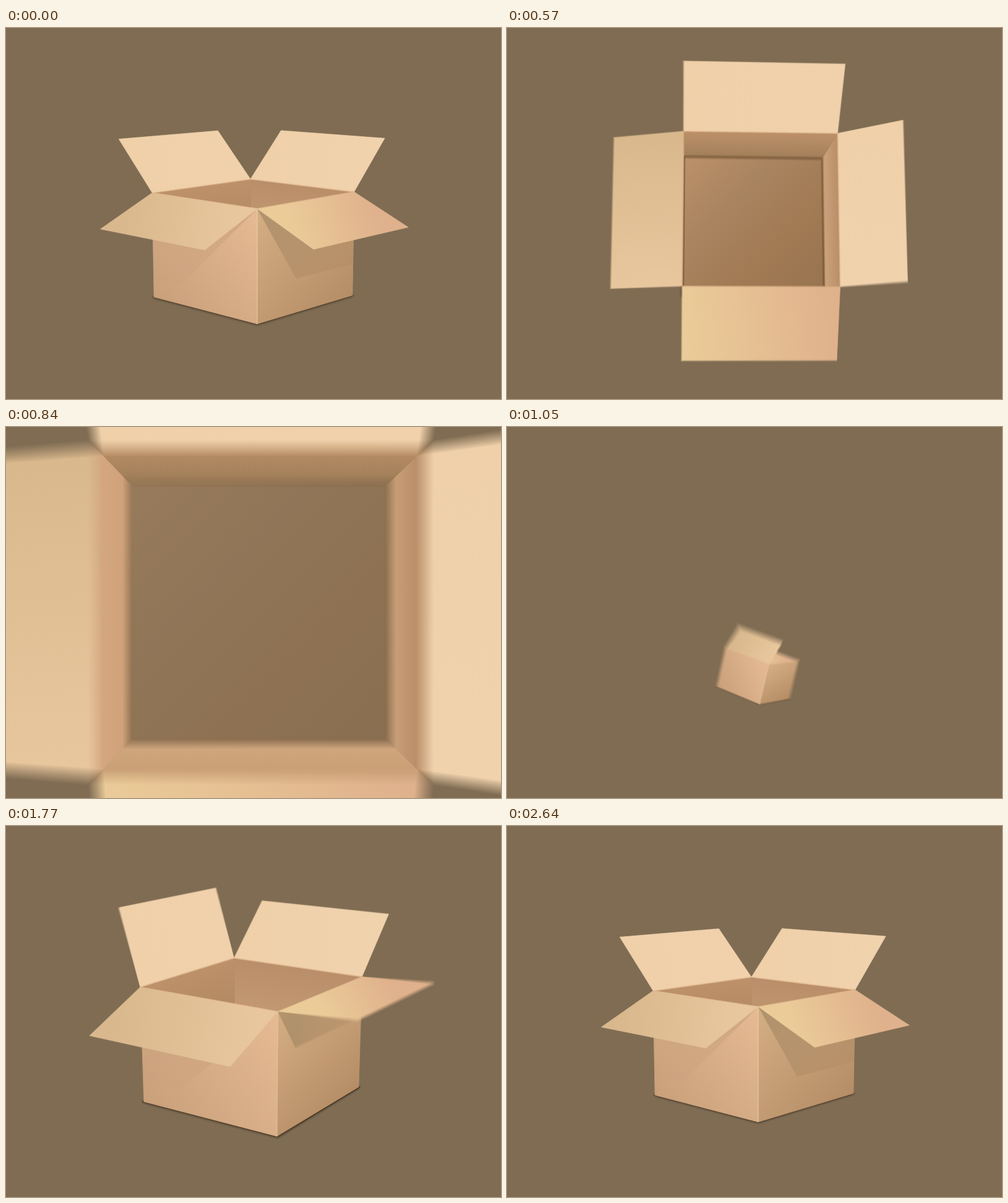
Animation of 800 by 600 pixels, one loop 2670 ms. Source, as an HTML page with a canvas:

```html
<!DOCTYPE html>
<html lang="en">
<head>
<meta charset="utf-8">
<title>Box loop</title>
<style>
  html, body { margin: 0; width: 100%; height: 100%; overflow: hidden; background: #7f6c53; }
  canvas { display: block; width: 800px; height: 600px; }
</style>
</head>
<body>
<canvas id="stage" width="800" height="600"></canvas>
<script>
const LOOP = 2670, STEP = 30, SHUTTER = 15, SAMPLES = 12;
const BG = '#7f6c53', FOCAL = 1560, NEAR = 20;
const SIDE = 231, HEIGHT = 173, FLAP = SIDE / 2;
const DIVE_END = 945, SPAWN = 950;
const RAD = Math.PI / 180;

const view = document.getElementById('stage').getContext('2d');
const buffer = document.createElement('canvas');
buffer.width = 800;
buffer.height = 600;
const ctx = buffer.getContext('2d');

// Sides run left, front, right, back; "out" is the outward direction on the floor plane.
const CORNERS = [[-.5, -.5], [.5, -.5], [.5, .5], [-.5, .5]];
const SIDES = [
  { out: [0, -1], rest: 203, opens: 950, flap: ['#d9b88d', '#e9c79e'], inner: ['#d6aa84', '#d0a27a'], outer: ['#c8a07a', '#e6bb94'] },
  { out: [1, 0], rest: 203, opens: 1322, flap: ['#ebcc99', '#dfb18c'], inner: ['#c9a076', '#d2a880'], outer: ['#d5ae84', '#b58d66'] },
  { out: [0, 1], rest: 135, opens: 1097, flap: ['#f0d2ad', '#efd0a9'], inner: ['#b98e69', '#cda57c'], outer: ['#c9a27c', '#c9a27c'] },
  { out: [-1, 0], rest: 135, opens: 1386, flap: ['#f0d1ab', '#efd0a9'], inner: ['#bd9169', '#a3805a'], outer: ['#c9a27c', '#c9a27c'] }
];
const FLAP_ORDER = [2, 3, 1, 0];

const POP = {
  scale: [[SPAWN, 0], [1050, .378], [1410, 1.2], [1650, 1.13], [2160, 1.032], [LOOP, 1]],
  turn: [[SPAWN, 40], [1050, 33.4], [1440, 28], [1650, 32], [2160, 39.3], [LOOP, 43.1]],
  pitch: [[SPAWN, 5], [1050, 10.4], [1430, 20.7], [1650, 17], [2160, 11.9], [LOOP, 9.6]],
  roll: [[SPAWN, 18], [1050, 12.7], [1400, 0], [LOOP, 0]]
};

const clamp = x => Math.min(1, Math.max(0, x));
const inOut = (x, power) => x < .5 ? (2 * x) ** power / 2 : 1 - (2 - 2 * x) ** power / 2;
const outQuad = x => 1 - (1 - x) ** 2;
const mix = (p, q, k) => p.map((v, i) => v + (q[i] - v) * k);

// Monotone cubic through [time, value] keys.
function track(keys, t) {
  const slope = i => (keys[i + 1][1] - keys[i][1]) / (keys[i + 1][0] - keys[i][0]);
  const tangent = i => {
    if (i === 0) return slope(0);
    if (i === keys.length - 1) return 0;
    const a = slope(i - 1), b = slope(i);
    return a * b <= 0 ? 0 : 2 * a * b / (a + b);
  };
  let i = 0;
  while (i < keys.length - 2 && t > keys[i + 1][0]) i++;
  const [t0, v0] = keys[i], [t1, v1] = keys[i + 1];
  const d = t1 - t0, x = clamp((t - t0) / d), y = 1 - x;
  return v0 * y * y * (1 + 2 * x) + v1 * x * x * (3 - 2 * x)
    + d * x * y * (tangent(i) * y - tangent(i + 1) * x);
}

function divePose(t) {
  const u = inOut(clamp(t / 785), 2.3);
  const rush = Math.max(0, (t - 255) / 465) ** 3;
  return {
    turn: 43.1 + 28.9 * u,
    pitch: 9.6 + 80.4 * u,
    roll: u * (73.2 - 55.2 * u),
    scale: 1,
    pivot: .5,
    at: [5 * u, 51 * (1 - u), 1575 + 85 * u - 449 * rush],
    fade: clamp((t - 750) / 170),
    angles: SIDES.map(s => s.rest)
  };
}

function popPose(t) {
  const roll = track(POP.roll, t);
  return {
    turn: track(POP.turn, t),
    pitch: track(POP.pitch, t),
    roll,
    scale: track(POP.scale, t),
    pivot: 1,
    at: [-.15 * roll, 136.3 - .35 * roll, 1589],
    fade: 0,
    angles: SIDES.map(s => s.rest * outQuad(clamp((t - s.opens) / 700)))
  };
}

// Returns a function from box coordinates (floor plane u, v; depth below the rim) to camera space.
function placer(pose) {
  const [ca, cp, cr] = [pose.turn, pose.pitch, pose.roll].map(d => Math.cos(d * RAD));
  const [sa, sp, sr] = [pose.turn, pose.pitch, pose.roll].map(d => Math.sin(d * RAD));
  const rolled = ([x, y, z]) => [x * cr - y * sr, x * sr + y * cr, z];
  const e1 = rolled([ca, sa * sp, -sa * cp]);
  const e2 = rolled([sa, -ca * sp, ca * cp]);
  const e3 = rolled([0, cp, sp]);
  return (u, v, down) => pose.at.map((c, i) =>
    c + pose.scale * (u * e1[i] + v * e2[i] + (down - HEIGHT * pose.pivot) * e3[i]));
}

function project([x, y, z]) {
  const k = FOCAL / Math.max(z, NEAR);
  return [400 + x * k, 300 + y * k];
}

function clipNear(points) {
  const result = [];
  points.forEach((p, i) => {
    const q = points[(i + 1) % points.length];
    if (p[2] >= NEAR) result.push(p);
    if ((p[2] >= NEAR) !== (q[2] >= NEAR)) result.push(mix(p, q, (NEAR - p[2]) / (q[2] - p[2])));
  });
  return result;
}

function area(points) {
  const flat = clipNear(points).map(project);
  return flat.reduce((sum, p, i) => {
    const q = flat[(i + 1) % flat.length];
    return sum + p[0] * q[1] - q[0] * p[1];
  }, 0);
}

function trace(points) {
  ctx.beginPath();
  clipNear(points).map(project).forEach(p => ctx.lineTo(p[0], p[1]));
  ctx.closePath();
}

function face(points, paint, seam = true) {
  trace(points);
  ctx.fillStyle = paint;
  ctx.fill();
  if (seam) {
    ctx.strokeStyle = paint;
    ctx.lineWidth = .6;
    ctx.stroke();
  }
}

function line(p, q, color, width) {
  if (p[2] < NEAR || q[2] < NEAR) return;
  ctx.beginPath();
  ctx.moveTo(...project(p));
  ctx.lineTo(...project(q));
  ctx.strokeStyle = color;
  ctx.lineWidth = width;
  ctx.stroke();
}

function flatGradient(from, to, colors) {
  const g = ctx.createLinearGradient(...from, ...to);
  colors.forEach((c, i) => g.addColorStop(i / (colors.length - 1), c));
  return g;
}

const gradient = (from, to, colors) => flatGradient(project(from), project(to), colors);

// Shades a wall from rim to floor, at a right angle to the rim on screen.
function wallGradient([p, q, r, s], colors) {
  const a = project(p), b = project(q);
  const top = mix(a, b, .5), low = mix(project(r), project(s), .5);
  const dx = b[0] - a[0], dy = b[1] - a[1];
  const along = ((low[0] - top[0]) * dx + (low[1] - top[1]) * dy) / (dx * dx + dy * dy || 1);
  return flatGradient(top, [low[0] - along * dx, low[1] - along * dy], colors);
}

function drawBox(pose) {
  if (pose.scale < .01) return;
  const place = placer(pose);
  const ring = (down, grow = 1) =>
    CORNERS.map(([u, v]) => place(u * SIDE * grow, v * SIDE * grow, down));
  const rim = ring(0), base = ring(HEIGHT);
  const walls = SIDES.map((_, i) => {
    const j = (i + 1) % 4;
    return [rim[i], rim[j], base[j], base[i]];
  });
  const outside = walls.map(w => area(w) > 0);

  ctx.save();
  ctx.shadowColor = 'rgba(20,12,4,.85)';
  ctx.shadowBlur = 4 * pose.scale;
  face(ring(HEIGHT, 1.016), 'rgba(50,38,25,.9)', false);
  ctx.restore();

  face(base, gradient(base[0], base[2], ['#bb9169', '#a98460', '#a17a53', '#977350']));
  if (pose.fade) {
    ctx.globalAlpha = pose.fade;
    face(base, BG);
    ctx.globalAlpha = 1;
  }

  walls.forEach((w, i) => {
    if (outside[i]) return;
    face(w, wallGradient(w, SIDES[i].inner));
    line(w[2], w[3], `rgba(80,52,28,${.5 * (1 - pose.fade)})`, 3);
    line(w[0], w[1], 'rgba(222,182,142,.8)', 2);
  });

  walls.forEach((w, i) => {
    if (!outside[i]) return;
    const [from, to] = i === 0 ? [w[3], w[1]] : [w[0], w[2]];
    face(w, gradient(from, to, SIDES[i].outer));
    if (i < 2) drawFlapShadow(w, i, clamp((pose.angles[i] - 150) / 53));
  });
  if (outside[0] && outside[1]) line(rim[1], base[1], 'rgba(240,210,176,.7)', 1.4);

  FLAP_ORDER.forEach(i => {
    const { out, flap } = SIDES[i];
    const reach = -Math.cos(pose.angles[i] * RAD) * FLAP;
    const lift = Math.sin(pose.angles[i] * RAD) * FLAP;
    const tip = j => place(
      CORNERS[j][0] * SIDE + out[0] * reach, CORNERS[j][1] * SIDE + out[1] * reach, -lift);
    const j = (i + 1) % 4;
    const quad = [rim[i], rim[j], tip(j), tip(i)];
    face(quad, gradient(mix(quad[0], quad[3], .6), mix(quad[1], quad[2], .4), flap));
    line(rim[i], rim[j], 'rgba(222,182,142,.7)', 1.2);
  });
}

function drawFlapShadow(wall, side, size) {
  if (!size) return;
  const on = (x, y) => mix(mix(wall[0], wall[1], x), mix(wall[3], wall[2], x), y);
  if (side === 0) {
    const y = .82 * size;
    face([on(0, 0), on(1, 0), on(1 - .72 * size, y), on(0, y)],
      gradient(on(1, 0), on(.2, y), ['rgba(170,132,96,.35)', 'rgba(190,150,115,.08)']), false);
  } else {
    const y = .69 * size;
    face([on(0, 0), on(.38 * size, y), on(1, y), on(1, 0)],
      gradient(on(.2, 0), on(1, y), ['rgba(150,127,92,.55)', 'rgba(165,130,92,.2)']), false);
  }
}

function drawScene(t) {
  ctx.fillStyle = BG;
  ctx.fillRect(0, 0, 800, 600);
  if (t < DIVE_END) drawBox(divePose(t));
  else if (t > SPAWN) drawBox(popPose(t));
}

// Averages several moments inside the shutter to get motion blur.
function render(t) {
  for (let i = 0; i < SAMPLES; i++) {
    const moment = t + SHUTTER * ((i + .5) / SAMPLES - .5);
    drawScene((moment + LOOP) % LOOP);
    view.globalAlpha = 1 / (i + 1);
    view.drawImage(buffer, 0, 0);
  }
}

const start = performance.now();
let shown = -1;
function tick() {
  const t = Math.floor((performance.now() - start) % LOOP / STEP) * STEP;
  if (t !== shown) {
    render(t);
    shown = t;
  }
  requestAnimationFrame(tick);
}
tick();
</script>
</body>
</html>
```
